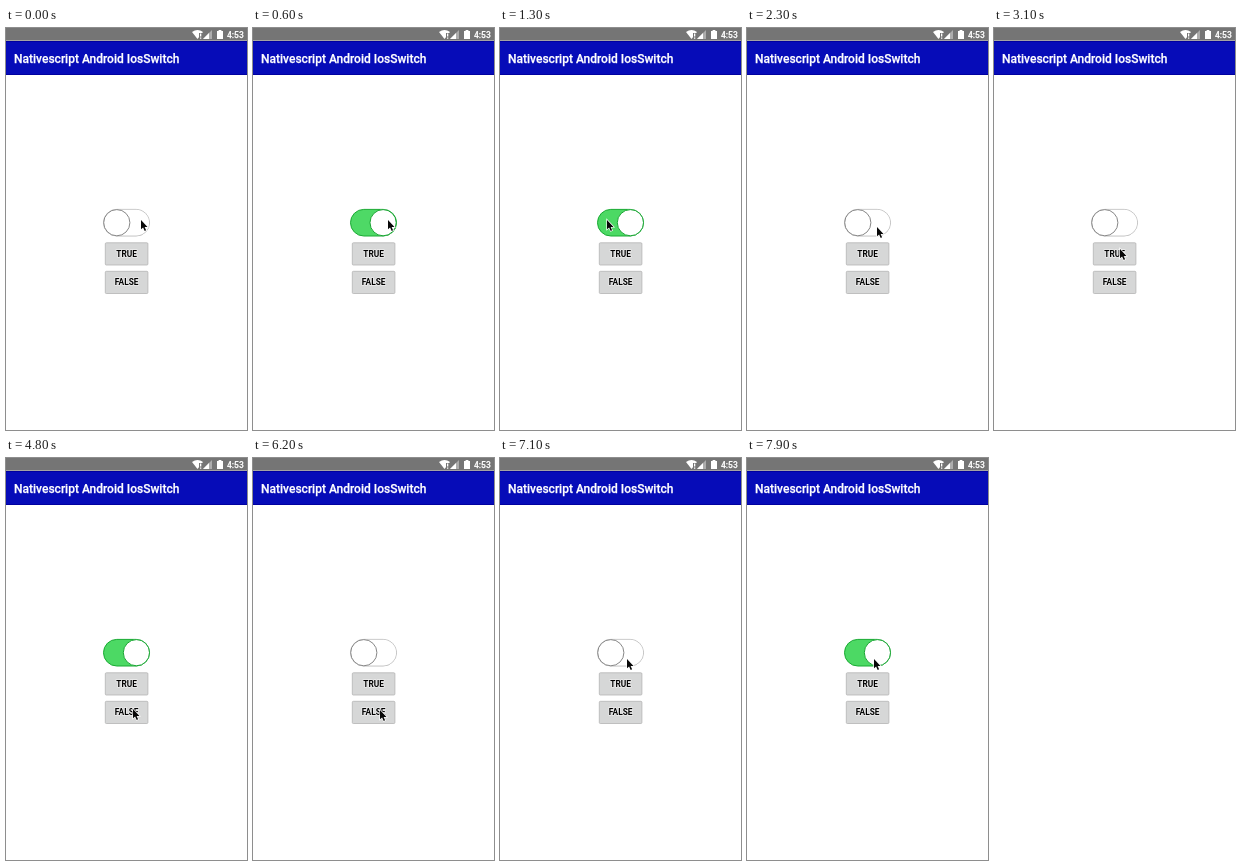
An HTML page that plays this animation: 241x402 px, repeating every 8000 ms.

```html
<!DOCTYPE html>
<html lang="en">
<head>
<meta charset="utf-8">
<title>Switch demo</title>
<style>
  html, body { margin: 0; width: 100%; height: 100%; overflow: hidden; background: #fff; }
  svg { display: block; width: 100%; height: 100%; }
  text { font-family: Roboto, Arial, sans-serif; font-weight: 500; paint-order: stroke; }
  .light { fill: #fff; stroke: #fff; stroke-width: .25; }
  .button rect { stroke: #b4b4b4; stroke-width: .8; }
  .button text { font-size: 8.3px; font-weight: 700; fill: #000; stroke: #eee; stroke-width: 1.4; text-anchor: middle; }
</style>
</head>
<body>
<svg viewBox="0 0 241 402">
  <rect width="241" height="402" fill="#fff"/>
  <rect y="13" width="241" height="34" fill="#060cb8"/>
  <path d="M0 13.500H241M0 46.500H241" stroke="#0000a0"/>
  <rect width="241" height="13" fill="#757575"/>
  <path d="M0 12.500H241" stroke="#a4a4a4"/>

  <g fill="#fff">
    <path d="M186 4Q191.500 0 197 4L191.500 11Z"/>
    <path d="M193 5h4v6h-4z" fill="#757575"/>
    <path d="M194 5.500h1.300v3h-1.300zM194 9.500h1.300v1.300h-1.300z"/>
    <path d="M197 11L206 2V11Z" opacity=".4"/>
    <path d="M197 11L203 5V11Z"/>
    <path d="M211 3h1.600V2h2.800v1H217v8h-6z"/>
    <text class="light" x="221" y="10" font-size="8.5">4:53</text>
    <text class="light" x="8" y="35" font-size="12">Nativescript Android IosSwitch</text>
  </g>

  <rect id="track" x="97.500" y="181.400" width="46" height="26.600" rx="13.300"/>
  <rect id="hole" fill="#fff"/>
  <circle id="thumb" cy="194.700" r="13.100" fill="#fff"/>

  <g class="button">
    <rect id="yes" x="99.300" y="214.800" width="42.600" height="22.200" rx="1"/>
    <text x="120.600" y="229">TRUE</text>
  </g>
  <g class="button">
    <rect id="no" x="99.300" y="243.300" width="42.600" height="22.200" rx="1"/>
    <text x="120.600" y="257.400">FALSE</text>
  </g>

  <path id="cursor" d="M0 0V9.300L2.100 7.400L3.700 10.900L5.100 10.300L3.600 6.900H6.500Z"
        fill="#080808" stroke="#fff" stroke-width="1.300" paint-order="stroke"/>
</svg>
<script>
  const LOOP = 8000, STEP = 100, SLIDE = 400, HOLD = 400;
  const [track, hole, thumb, yes, no, cursor] =
    ["track", "hole", "thumb", "yes", "no", "cursor"].map(id => document.getElementById(id));

  // Times at which the switch flips, starting from off.
  const flips = [300, 1700, 4100, 5300, 7300];
  const [yesClick, noClick] = flips.slice(2);

  // Cursor stops: time, x, y.
  const stops = [
    [0, 135, 192], [600, 135, 192], [1100, 107, 192], [1800, 107, 192],
    [2300, 130, 199], [2800, 126, 221], [4200, 126, 221], [4700, 127, 251],
    [5500, 127, 252], [6300, 127, 252], [6900, 127, 201], [8000, 127, 201]
  ];

  const clamp = v => Math.max(0, Math.min(1, v));
  const mix = (a, b, p) => a + (b - a) * p;
  const smooth = p => p * p * (3 - 2 * p);
  const blend = (a, b, p) => `rgb(${a.map((v, i) => Math.round(mix(v, b[i], p)))})`;
  const setAll = (el, attrs) => {
    for (const key in attrs) el.setAttribute(key, attrs[key]);
  };

  function switchAt(t) {
    return flips.reduce((on, start, i) => {
      const p = 1 - (1 - clamp((t - start) / SLIDE)) ** 3;
      return mix(on, i % 2 ? 0 : 1, p);
    }, 0);
  }

  function cursorAt(t) {
    const i = stops.findIndex(s => s[0] > t);
    const a = stops[i - 1], b = stops[i];
    const p = smooth((t - a[0]) / (b[0] - a[0]));
    return [mix(a[1], b[1], p), mix(a[2], b[2], p)];
  }

  // A button stays dark from the press until its click fires.
  const buttonFill = (t, click) => t >= click - HOLD && t <= click ? "#c9caca" : "#d6d7d7";

  function draw(now) {
    const t = Math.floor((now % LOOP) / STEP) * STEP;
    const on = switchAt(t);
    const half = 12.9 * (1 - on);
    const left = mix(97.9, 130.4, on), right = mix(143.1, 130.4, on);
    const edge = to => blend([190, 190, 190], to, on);

    setAll(track, { fill: blend([210, 210, 210], [76, 217, 100], on), stroke: edge([24, 170, 50]) });
    setAll(hole, { x: left, y: 194.7 - half, width: right - left, height: half * 2, rx: half });
    setAll(thumb, { cx: mix(110.8, 130.4, on), stroke: blend([135, 135, 135], [24, 165, 50], on) });
    setAll(yes, { fill: buttonFill(t, yesClick) });
    setAll(no, { fill: buttonFill(t, noClick) });
    setAll(cursor, { transform: `translate(${cursorAt(t)})` });
    requestAnimationFrame(draw);
  }
  requestAnimationFrame(draw);
</script>
</body>
</html>
```
